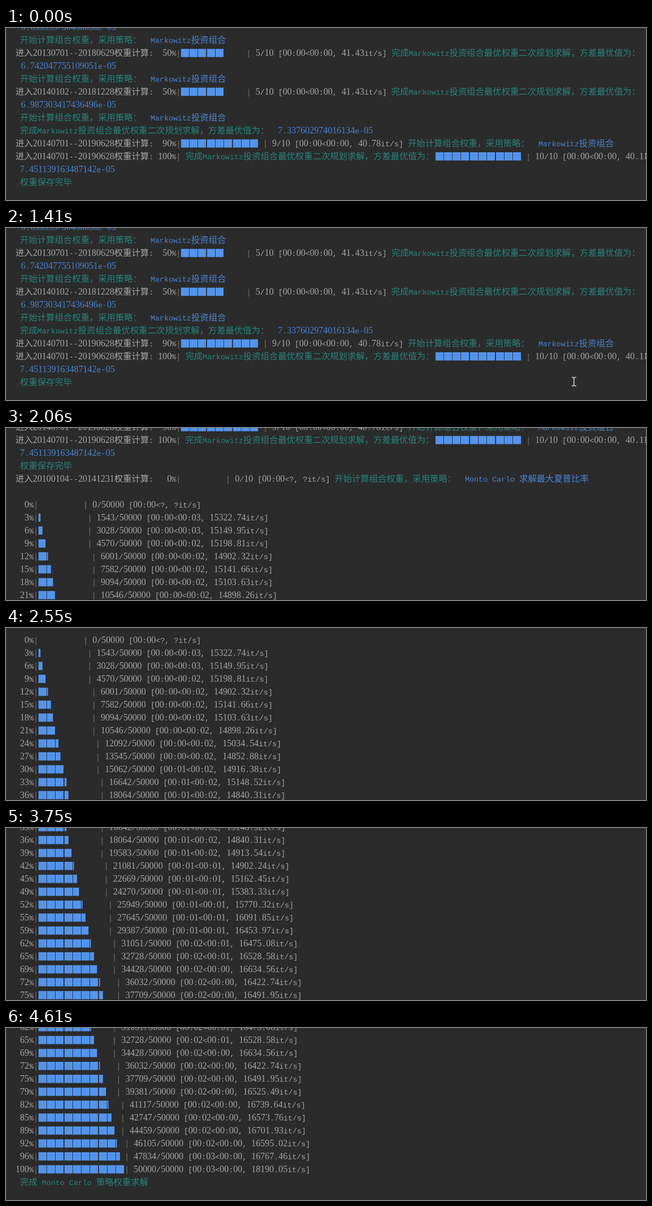
Animation of 1280 by 346 pixels, one loop 4.74 s. Source, as an HTML page:

```html
<!DOCTYPE html>
<html lang="zh-CN">
<head>
<meta charset="utf-8">
<title>Console</title>
<style>
  html, body { margin: 0; width: 100%; height: 100%; overflow: hidden; background: #2b2b2b; }
  #stage {
    position: relative; width: 1280px; height: 346px; overflow: hidden; box-sizing: border-box;
    border-bottom: 1px solid #252525; background: #2b2b2b;
  }
  #stage::before { content: ""; position: absolute; left: 0; top: 0; width: 1px; height: 100%; background: #424242; }
  #log { position: absolute; left: 19px; top: -13px; color: #a8a8a8; text-spacing-trim: space-all; }
  .row { height: 26px; white-space: pre; font: 15.08px/26px "Liberation Mono", monospace; }
  .row span { line-height: 0; }
  .num { font: 18.1px "Liberation Serif", serif; }
  .han { font: 300 17.35px "Noto Sans CJK SC", "Noto Sans CJK", sans-serif; }
  .rule { font: 15.04px "DejaVu Sans Mono", monospace; color: #727272; }
  .teal { color: #28857d; }
  .blue { color: #4a86d6; }
  .nudge { padding-left: 2px; }
  .cell {
    display: inline-block; width: 17.3px; height: 17px; vertical-align: -3px;
    background: linear-gradient(#5394ec, #5394ec) .4px 0 / calc(var(--n) * 2px) 16.5px no-repeat;
  }
  #caret { position: absolute; left: -6px; top: -10px; width: 12px; height: 20px; visibility: hidden; }
</style>
</head>
<body>
<div id="stage">
  <div id="log"></div>
  <svg id="caret" viewBox="0 0 12 20" fill="none" stroke="#eee" stroke-width="1.5">
    <path d="M1.5 1.5H4.5L6 2.5L7.5 1.5H10.5M6 2.5V17.5M1.5 18.5H4.5L6 17.5L7.5 18.5H10.5"/>
  </svg>
</div>
<script>
const LOOP = 4740, ROW = 26, TOTAL = 50000, SAMPLES = 31;
const log = document.getElementById('log');
const caret = document.getElementById('caret');

const span = (cls, html) => `<span class="${cls}">${html}</span>`;

// Split a string into digit, Chinese and rule runs, each with its own face.
const text = s => s.replace(/(\d+)|([\u3000-\u9fff\uff00-\uffef]+)|(\|)|(<)/g, (m, num, han, rule) =>
  num ? span('num', m) : han ? span('han', m) : rule ? span('rule', m) : '&lt;');
const teal = s => span('teal', text(s));
const blue = s => span('blue', text(s));

const cell = n => `<i class="cell" style="--n:${n}"></i>`;
const bar = eighths => {
  const full = eighths >> 3, part = eighths & 7;
  return cell(8).repeat(full) + (part ? cell(part) : '') + ' '.repeat(10 - full - (part ? 1 : 0));
};

const begin = name => teal('开始计算组合权重，采用策略：') + blue('  ' + name);
const markowitz = begin('Markowitz投资组合');
const solved = teal('完成Markowitz投资组合最优权重二次规划求解，方差最优值为：');
const value = s => span('nudge', blue(' ' + s));
const period = (range, pct) => text(`进入${range}权重计算: ${String(pct).padStart(3)}%|`);
const half = range => period(range, 50) + bar(40) + text('| 5/10 [00:00<00:00, 41.43it/s] ') + solved;

const progress = (done, times) =>
  text(String(Math.round(done / TOTAL * 100)).padStart(3) + '%|') +
  bar(Math.floor(done / TOTAL * 80)) + text(`| ${done}/${TOTAL} [${times}it/s]`);

// Ten reports a second: a steady pace that quickens halfway, with a little jitter
// and a smoothed rate.
function sampleRows() {
  const rows = [];
  let last = 0, rate = 0;
  for (let i = 1; i <= SAMPLES; i++) {
    const pace = 1509 * i + 170 * Math.max(0, i - 15);
    const done = i < SAMPLES ? Math.round(pace + 45 * Math.sin(i * i * 2.3)) : TOTAL;
    const now = (done - last) / 0.1007;
    rate = i > 1 ? 0.3 * now + 0.7 * rate : now;
    last = done;
    const spent = Math.floor(i / 10), left = Math.floor((TOTAL - done) / rate);
    rows.push(progress(done, `00:0${spent}<00:0${left}, ${rate.toFixed(2)}`));
  }
  return rows;
}

const rows = [
  value('6.698595730438056e-05'),
  ' ' + markowitz,
  half('20130701--20180629'),
  value('6.742047755109051e-05'),
  ' ' + markowitz,
  half('20140102--20181228'),
  value('6.987303417436496e-05'),
  ' ' + markowitz,
  ' ' + solved + blue('  7.337602974016134e-05'),
  period('20140701--20190628', 90) + bar(72) + text('| 9/10 [00:00<00:00, 40.78it/s] ') + markowitz,
  period('20140701--20190628', 100) + ' ' + solved + span('nudge', bar(80)) +
    text(' | 10/10 [00:00<00:00, 40.11it/s]'),
  blue(' 7.451139163487142e-05'),
  teal(' 权重保存完毕'),
  period('20100104--20141231', 0) + bar(0) + text('| 0/10 [00:00<?, ?it/s] ') +
    begin('Monto Carlo 求解最大夏普比率'),
  '',
  progress(0, '00:00<?, ?'),
  ...sampleRows(),
  teal(' 完成 Monto Carlo 策略权重求解')
];
log.innerHTML = rows.map(r => `<div class="row">${r}</div>`).join('');

// Hold each state until the next time, then jump.
function jump(el, states, style) {
  const frames = states.map(([ms, ...v]) => ({ offset: ms / LOOP, easing: 'steps(1, end)', ...style(...v) }));
  frames.push({ ...frames[frames.length - 1], offset: 1 });
  el.animate(frames, { duration: LOOP, iterations: Infinity });
}

// Rows scrolled off at a few moments; the console redraws about every 240 ms between them.
const START = 1560;
const marks = [[START, 4], [1720, 7], [2060, 9], [3030, 20], [3750, 26], [4610, 35]];
const scroll = [[0, 0]];
marks.forEach(([t, n], i) => {
  const [t2, n2] = marks[i + 1] || [t, n];
  const steps = Math.max(1, Math.round((t2 - t) / 240));
  for (let k = 0; k < steps; k++)
    scroll.push([t + (t2 - t) * k / steps, Math.floor(n + (n2 - n) * k / steps)]);
});
jump(log, scroll, n => ({ transform: `translateY(${-n * ROW}px)` }));
jump(log.children[13], [[0, 'hidden'], [START, 'visible']], v => ({ visibility: v }));

// The pointer swings up into view and out again, then shows briefly further right.
const swing = Array.from({ length: 8 }, (_, i) =>
  [690 + 36 * i, 1003 - 45 * i / 7, 333 - 130 * Math.sin(Math.PI * i / 7)]);
jump(caret, [[0], ...swing, [980], [1390, 1117, 331], [1410, 1136, 309], [1440]], (x, y) => ({
  visibility: x ? 'visible' : 'hidden',
  transform: `translate(${x || 0}px, ${y || 0}px)`
}));
</script>
</body>
</html>
```
